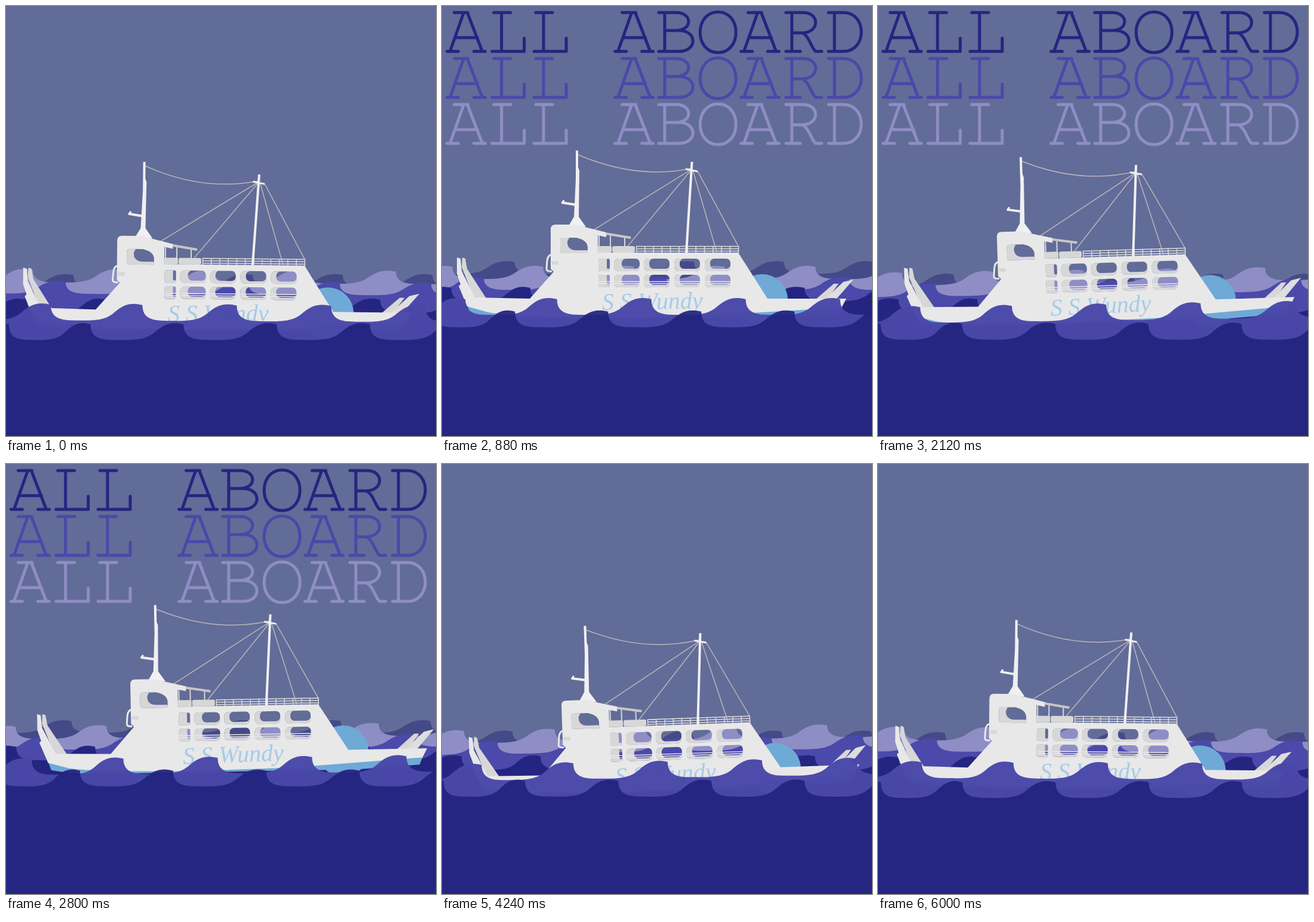
Recreate the animation shown at these times as an HTML page. Size 720 by 720 pixels, loop 6.04 s.

```html
<!DOCTYPE html>
<html lang="en">
<head>
<meta charset="utf-8">
<title>All aboard</title>
<style>
  html, body { margin: 0; width: 100%; height: 100%; overflow: hidden; background: #626c98; }
  svg { display: block; width: 100vw; height: 100vh; }
  .line { fill: none; stroke-linecap: round; stroke-linejoin: round; }
  .rope { fill: none; stroke: #b9b6ba; stroke-width: 1.5; }
  .white { fill: #e8e8e8; }
  .grey { fill: #d7d7d7; }
  .mast { fill: #f0f0f2; }
  .name { font: italic 40px "Liberation Serif", "Noto Serif", serif; fill: #a6cbe9; }
  .label { font: 117px "Liberation Mono", monospace; fill: none; }
</style>
</head>
<body>
<svg viewBox="0 0 720 720">
  <rect width="720" height="720" fill="#626c98"/>
  <g id="title"></g>
  <g id="back"></g>
  <g id="boat">
    <circle cx="536" cy="492" r="43" fill="#6fa9d6"/>
    <path fill="#6fa9d6" d="M42 501L47 515Q80 523 150 523H560L664 517L671 500Z"/>
    <path class="grey" d="M34 421L39 423L42 440L75 491H54L33 437ZM626 491L656 465L664 465L645 491Z"/>
    <path fill="#dededc" d="M641 491L672 462L689 458L660 491Z"/>
    <g class="rope">
      <path d="M228 249Q325 291 417 272"/>
      <path d="M417 274L254 375M417 275L311 402M420 275L460 412M428 277L496 402"/>
    </g>
    <path fill="none" stroke="#d7d7d7" stroke-width="2" d="M263 383V403M282 384V403M306 387V403"/>
    <path fill="none" stroke="#c9c5c6" stroke-width="4" d="M273 381L316 388"/>
    <path id="rail" fill="none" stroke="#dcdcdf" stroke-width="1.5"/>
    <path class="mast" d="M224 242H228L228 270L230 276L229 353L241 370L212 368L221 353L224 290Z"/>
    <path fill="none" stroke="#f0f0f2" stroke-width="4" d="M200 329L225 333M418.5 261L409 414"/>
    <path fill="none" stroke="#f0f0f2" stroke-width="3" d="M202 330L204 325M408 273L428 277"/>
    <path fill="none" stroke="#e8e8e8" stroke-width="3" d="M184 416Q177 417 176 427L175 441Q176 445 184 444"/>
    <path id="hull" class="white" fill-rule="evenodd"/>
    <path id="frames" class="grey" fill-rule="evenodd"/>
    <path class="grey" d="M184 427H195V433H184Z"/>
    <path stroke="#e8e8e8" stroke-width="1.5" d="M262 461.5H484M262 465H484"/>
    <text class="name" x="268" y="509" transform="rotate(-1 268 509)">S S Wundy</text>
  </g>
  <g id="front"></g>
</svg>
<script>
const LOOP = 6040, STEP = 40, BOB = LOOP / 3;
const $ = id => document.getElementById(id);
const NS = "http://www.w3.org/2000/svg";

function add(parent, tag, attrs) {
  const el = document.createElementNS(NS, tag);
  for (const k in attrs) el.setAttribute(k, attrs[k]);
  return parent.appendChild(el);
}

// Rounded rectangle as a subpath
function box(x, y, w, h, r) {
  const a = (dx, dy) => `a${r} ${r} 0 0 1 ${dx} ${dy}`;
  return `M${x + r} ${y}h${w - 2 * r}${a(r, r)}v${h - 2 * r}${a(-r, r)}` +
    `h${2 * r - w}${a(-r, -r)}v${2 * r - h}${a(r, -r)}z`;
}

// Title: slab letters as strokes inside cells 70.3 wide
const GLYPHS = {
  A: "M3 65H22M48 65H67M15 0H38M31 0L8 65M37 0L62 65M18 42H54",
  L: "M11 0H39M24 0V65M8 65H62V43",
  B: "M6 0H35C63 0 63 30 35 30H16M35 30H40C71 30 71 65 40 65H6M16 0V65",
  O: "M35 -1C75 -1 75 67 35 67C-5 67 -5 -1 35 -1Z",
  R: "M8 0H37C65 0 65 34 35 34H18M18 0V65M8 65H32M35 34C47 38 51 61 58 65H68",
  D: "M9 0H34C74 0 74 65 34 65H9M19 0V65"
};
["#242580", "#4a48a9", "#8f8dc6"].forEach((stroke, row) => {
  const y = 11 + row * 77;
  add($("title"), "text", { class: "label", x: 5, y: y + 65 }).textContent = "ALL ABOARD";
  [..."ALL ABOARD"].forEach((c, i) => {
    if (GLYPHS[c]) add($("title"), "path", {
      class: "line", d: GLYPHS[c], stroke, "stroke-width": 5,
      transform: `translate(${5.4 + i * 70.3} ${y})`
    });
  });
});

// Ship: hull with see-through windows
const panes = [], holes = [];
for (const y of [423, 450]) {
  panes.push(box(262, y, 19, 21, 3));
  holes.push(box(276, y, 5, 17, 2));
  [288, 338, 389, 440].forEach((x, i) => {
    const inset = i ? 9 : 13;
    panes.push(box(x, y, 43, 21, 7));
    holes.push(box(x + inset, y, 43 - inset, 17, 7));
  });
}
const cabin = "M203 388H225Q244 392 244 405V414H203Q198 414 198 409V393Q198 388 203 388Z";
const pane = "M213 388H225Q244 392 244 405V409H222Q209 407 210 394Z";
$("hull").setAttribute("d",
  "M25 421L31 423L33 444L55 488L147 490L187 445L182 440V374Q182 366 190 366L222 366" +
  "L275 379V387L261 384V413H496L545 490H677L669 505L450 518L290 521Q120 520 78 513L42 503" +
  "L28 469L31 466L25 448Z" + cabin + panes.join(""));
$("frames").setAttribute("d", cabin + pane + panes.join("") + holes.join("") +
  box(260, 402, 24, 11, 2) + box(285, 402, 38, 11, 3));
let rail = "M325 402.5H497M325 406.5H497M325 410.5H497";
for (let i = 0; i < 13; i++) rail += `M${325.5 + i * 14.25} 402V414`;
$("rail").setAttribute("d", rail);

// Periodic curve through values at the marks
const MARKS = [0, 880, 2120, 3520, 4240, 5280];
function drift(values, t) {
  const n = MARKS.length;
  const time = i => MARKS[(i + n) % n] + LOOP * Math.floor(i / n);
  const val = i => values[(i + n) % n];
  const slope = i => (val(i + 1) - val(i - 1)) / (time(i + 1) - time(i - 1));
  let i = n - 1;
  while (MARKS[i] > t) i--;
  const d = time(i + 1) - time(i), s = (t - time(i)) / d, r = 1 - s;
  return val(i) * (1 + 2 * s) * r * r + slope(i) * d * s * r * r +
    val(i + 1) * s * s * (3 - 2 * s) - slope(i + 1) * d * s * s * r;
}

const STILL = [0, 0, 0, 0, 0, 0];
// x: leftmost steep edge, first: width of the wave after it, y: crest; dx, dy: reach of the swing.
// Soft waves ease and stay level, the others tilt with the ship.
const waves = [
  { fill: "#444a88", gap: 150.3, x: 113, y: 449, h: 21, dx: -20, dy: -22.5, soft: true, extra: [0, 28, 14.5, 15, 7, 2] },
  { fill: "#8f8dc6", gap: 152, x: 45, y: 442, h: 22, dx: -34, dy: -8, extra: [0, 2, -1, -3, -1, -14] },
  { fill: "#4b49aa", gap: 153, x: 100, y: 462, h: 21, dx: -34, dy: -9 },
  { fill: "#242580", gap: 153.2, x: 35, first: 132, y: 490, h: 24, dx: -20, dy: -20.5, soft: true },
  { fill: "#4a48a9", gap: 158, x: 75, first: 153.5, y: 499.5, h: 28, dx: -41, dy: -12, front: true, alpha: 0.97 },
  { fill: "#242580", gap: 156, x: 5, first: 136.5, y: 531, h: 28, dx: -20, dy: -22, soft: true, front: true, alpha: 0.94 }
];
for (const w of waves) {
  const v = w.h / 28;
  let x = w.x - w.gap, d = `M${x} 800V${w.y + 2 * v}`;
  for (let i = 0; x < 850; i++) {
    const width = i === 1 && w.first || w.gap;
    const curve = (...p) => "C" + p.map((n, j) => j % 2 ? w.y + n * v : x + n * width / 157).join(" ");
    d += curve(0, 19, 9, 28, 36, 28) + curve(76, 29, 91, 28, 106, 17) + curve(121, 4, 133, -4, 157, 2);
    x += width;
  }
  w.el = add($(w.front ? "front" : "back"), "path", {
    d: d + "V800Z", fill: w.fill, "fill-opacity": w.alpha || 1
  });
}

const boatX = [3.6, 0, 19, 32, 20.2, 10];
const boatY = [-0.2, -1.3, -12.7, -5, 6.2, 4.1];
const boatTilt = [0.6, 0, -1.75, -0.25, -2, -1.15];
const clamp = n => Math.min(1, Math.max(0, n));

function draw(t) {
  const p = (t % BOB) / BOB;
  const swing = 1 - Math.abs(1 - 2 * p);
  const eased = (1 - Math.cos(2 * Math.PI * p)) / 2;
  const tilt = drift(boatTilt, t);
  for (const w of waves) {
    const s = w.soft ? eased : swing;
    const x = w.dx * s + drift(w.extra || STILL, t);
    w.el.setAttribute("transform",
      `translate(${x} ${w.dy * s}) rotate(${w.soft ? 0 : tilt * 0.45} 380 ${w.y})`);
  }
  const y = 20.5 - 20 * eased + drift(boatY, t);
  $("boat").setAttribute("transform",
    `translate(${drift(boatX, t)} ${y}) rotate(${tilt} 350 440)`);

  const enter = (1 - clamp((t - 200) / 440)) ** 3;
  const leave = clamp((t - 3860) / 360) ** 3;
  $("title").setAttribute("transform", `translate(0 ${-245 * (enter + leave)})`);
}

const begin = performance.now();
function tick() {
  const t = (performance.now() - begin) % LOOP;
  draw(Math.floor(t / STEP) * STEP);
  requestAnimationFrame(tick);
}
draw(0);
requestAnimationFrame(tick);
</script>
</body>
</html>
```
